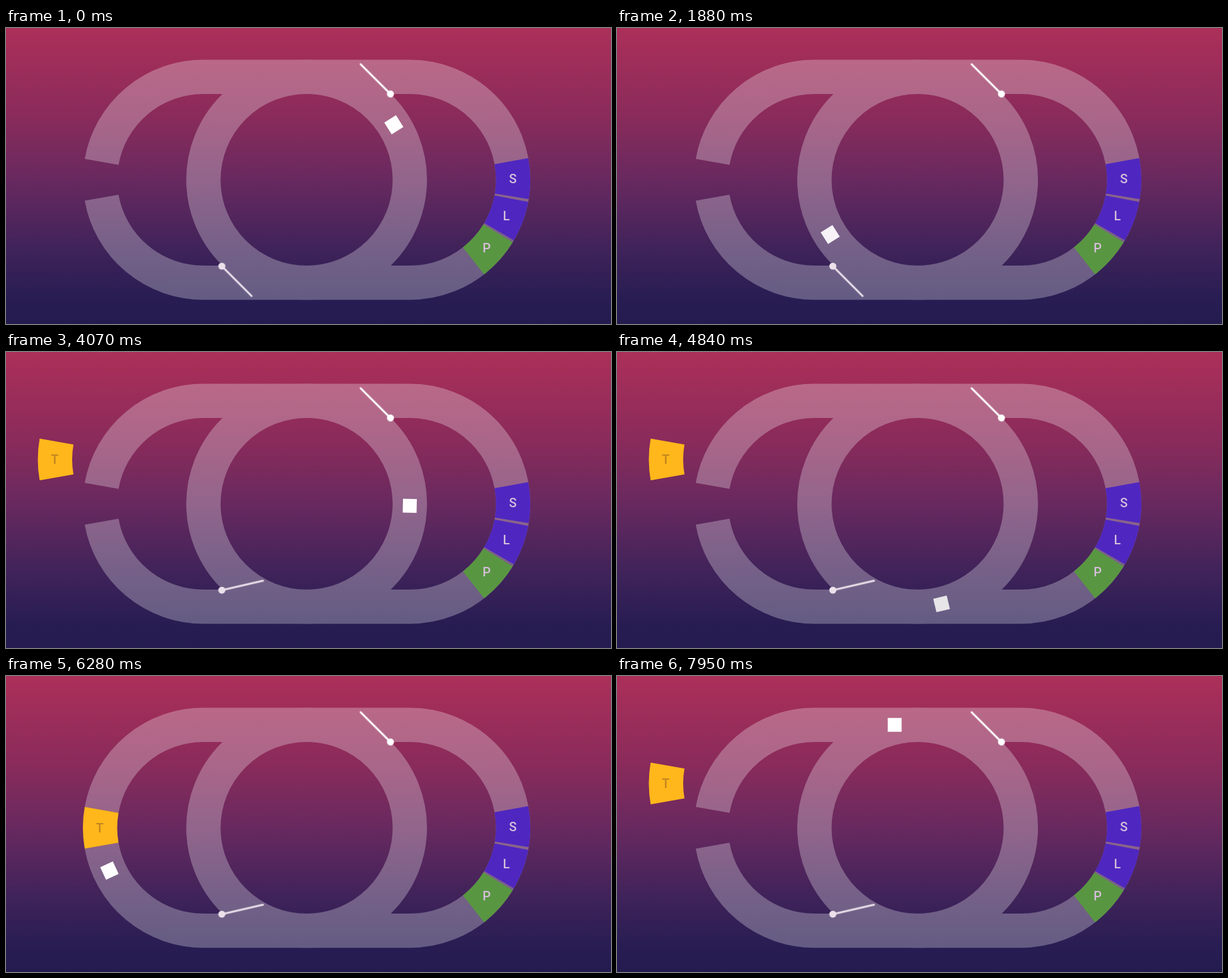
Animation, 960 px wide and 471 px high, one loop 8000 ms. Source, as an HTML page:

```html
<!DOCTYPE html>
<html lang="en">
<head>
<meta charset="utf-8">
<title>Track loop</title>
<style>
html, body { margin: 0; width: 100%; height: 100%; overflow: hidden; }
body {
  position: relative;
  background: linear-gradient(#ab3059 0, #a52e59 30px, #882b5b 145px, #68295f 241px, #40235a 350px, #281d53 430px, #241b4f 471px);
}
svg { position: absolute; left: 0; top: 0; display: block; }
text {
  font: 500 20px Roboto, Arial, sans-serif;
  text-anchor: middle;
  fill: #d6bedb;
}
.track { fill: none; stroke: #fff; stroke-width: 54.5; opacity: .28; }
.arm line { stroke: currentColor; stroke-width: 3; stroke-linecap: round; }
.arm circle { fill: currentColor; }

.runner {
  position: absolute;
  left: 0;
  top: 0;
  width: 22px;
  height: 22px;
  background: #fff;
  offset-path: path("M615.26 153.76 A163.75 163.75 0 0 1 338.74 329.24 A163.75 163.75 0 0 1 615.26 153.76 A163.75 163.75 0 0 1 477 405.25 H313 A163.75 163.75 0 0 1 313 77.75 H641");
  offset-rotate: auto;
  animation: run 8s linear infinite, shade 8s linear infinite;
}
@keyframes run {
  0% { offset-distance: 0; }
  23.5% { offset-distance: 514.7px; }
  36.25% { offset-distance: 796.5px; }
  50.875% { offset-distance: 1124px; }
  62.26% { offset-distance: 1378.7px; }
  68.5% { offset-distance: 1506.2px; }
  70.25% { offset-distance: 1542.7px; }
  87.625% { offset-distance: 1934px; }
  93.15% { offset-distance: 2057.1px; }
  99.375% { offset-distance: 2183.6px; }
  100% { offset-distance: 2196.4px; }
}
@keyframes shade {
  0%, 8%, 27%, 54%, 78%, 100% { background: #fff; }
  16%, 62%, 69% { background: #e2dfe3; }
  23.5% { background: #f7f2f8; }
}

.gate { animation: gate 8s ease-in-out infinite; }
@keyframes gate {
  0%, 28.75% { transform: rotate(45.2deg); }
  33.75%, 100% { transform: rotate(-13deg); }
}

/* The bridge waits outside, fills the gap for the runner, then withdraws. */
.bridge { animation: bridge 8s ease-in-out infinite; }
@keyframes bridge {
  0%, 30.5% { transform: translate(-71.5px, 0); opacity: 0; }
  32% { opacity: 1; }
  35.5%, 62.5% { transform: translate(-71.5px, -70.5px); }
  67%, 71.5% { transform: translate(-71.5px, 0); }
  76%, 83% { transform: translate(0, 0); }
  85.25% { transform: translate(-71.5px, 0); }
  87.5%, 100% { transform: translate(-71.5px, -70.5px); opacity: 1; }
}
</style>
</head>
<body>
<svg width="960" height="471" viewBox="0 0 960 471">
  <g class="track">
    <path d="M151.74 213.07 A163.75 163.75 0 0 1 313 77.75 H641 A163.75 163.75 0 0 1 641 405.25 H313 A163.75 163.75 0 0 1 151.74 269.93"/>
    <circle cx="477" cy="241.5" r="163.75"/>
  </g>
  <g id="blocks"></g>
  <g class="arm" color="#fff" transform="translate(610 105) rotate(-135)">
    <line x2="67"/><circle r="5.6"/>
  </g>
  <g class="arm" color="#ebe1eb" transform="translate(342.5 379)">
    <g class="gate"><line x2="67"/></g><circle r="5.6"/>
  </g>
</svg>
<div class="runner"></div>
<script>
const INNER = 136.5, OUTER = 191, CY = 241.5;
const blocks = document.getElementById("blocks");

const point = (cx, r, deg) => {
  const a = deg * Math.PI / 180;
  return [cx + r * Math.cos(a), CY + r * Math.sin(a)];
};

function addBlock({ letter, cx, from, to, fill, ink, name }) {
  const [labelX, labelY] = point(cx, (INNER + OUTER) / 2, (from + to) / 2);
  const outline = `M${point(cx, OUTER, from)} A${OUTER} ${OUTER} 0 0 1 ${point(cx, OUTER, to)}
    L${point(cx, INNER, to)} A${INNER} ${INNER} 0 0 0 ${point(cx, INNER, from)}Z`;
  blocks.insertAdjacentHTML("beforeend",
    `<g class="${name || "block"}"><path d="${outline}" fill="${fill}"/>
     <text x="${labelX - .5}" y="${labelY + 7}" style="fill:${ink || "#d6bedb"}">${letter}</text></g>`);
}

[
  { letter: "S", cx: 641, from: -10.4, to: 9.3, fill: "#4f27c0" },
  { letter: "L", cx: 641, from: 10.6, to: 30.3, fill: "#4f27c0" },
  { letter: "P", cx: 641, from: 31.4, to: 52, fill: "#599642" },
  { letter: "T", cx: 313, from: 170, to: 190, fill: "#ffb71b", ink: "#c2851f", name: "bridge" }
].forEach(addBlock);
</script>
</body>
</html>
```
